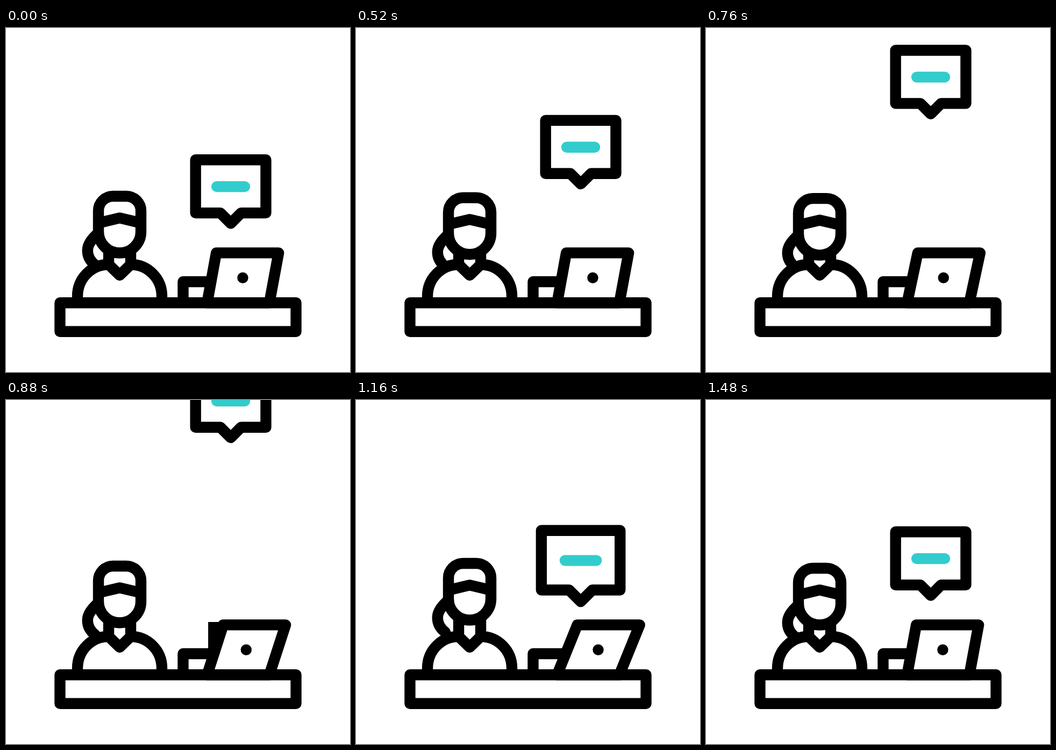
An HTML page with a canvas for the animation above (2 s loop, 640x640 px).

```html
<!DOCTYPE html>
<html lang="en">
<head>
<meta charset="utf-8">
<title>Reception desk</title>
<style>
  html, body { margin: 0; width: 100%; height: 100%; overflow: hidden; background: #fff; }
  canvas { display: block; width: 100vw; height: 100vh; }
</style>
</head>
<body>
<canvas id="stage" width="640" height="640"></canvas>
<script>
const ctx = document.getElementById('stage').getContext('2d');
const LOOP = 2000, STEP = 40;
const INK = '#000', TEAL = '#33cccc', LINE = 20.4;

// Eased value at time t through [time, value] keys.
function track(t, keys) {
  if (t <= keys[0][0]) return keys[0][1];
  for (let i = 1; i < keys.length; i++) {
    const [t0, a] = keys[i - 1], [t1, b] = keys[i];
    if (t < t1) {
      const p = (t - t0) / (t1 - t0);
      return a + (b - a) * p * p * (3 - 2 * p);
    }
  }
  return keys[keys.length - 1][1];
}

function draw(path, fill, color = INK) {
  if (fill) {
    ctx.fillStyle = '#fff';
    ctx.fill(path);
  }
  ctx.strokeStyle = color;
  ctx.stroke(path);
}

function polygon(points) {
  const path = new Path2D();
  points.forEach(([x, y]) => path.lineTo(x, y));
  path.closePath();
  return path;
}

const ponytail = new Path2D('M172 381C160 392 151.7 402 151.7 414C151.7 425 157 434 166 441');
const neck = new Path2D('M191 408V440M232 408V440');
const shirt = new Path2D(
  'M133 511V499C133 466 159 440 191 440L211.5 460L232 440C264 440 290 466 290 499V511');
const face = new Path2D(
  'M172 340A27 27 0 0 1 199 313H224A27 27 0 0 1 251 340V379A39.5 39.5 0 0 1 172 379Z');
const fringe = new Path2D('M172 362.7L211.5 353.4L251 362.7');
const stand = new Path2D('M329.5 511V472H398');
const desk = new Path2D('M100.4 511.2H539.6V564.8H100.4Z');

const BUBBLE_X = 418.1, BUBBLE_Y = 304.5;
const bubbleOutline = [
  [-65.4, -59.3], [65.4, -59.3], [65.4, 39.6], [19.3, 39.6],
  [0, 59], [-19.3, 39.6], [-65.4, 39.6]
];

// Scales the geometry only, so the line weight stays constant.
function drawBubble(y, scale) {
  const place = ([px, py]) => [BUBBLE_X + px * scale, y + py * scale];
  ctx.lineJoin = scale < 0.6 ? 'miter' : 'round';
  draw(polygon(bubbleOutline.map(place)), true);
  ctx.lineJoin = 'round';
  draw(polygon([[-26, -9.4], [26, -9.4]].map(place)), false, TEAL);
}

function drawPerson(headY) {
  ctx.save();
  ctx.translate(0, headY);
  draw(ponytail);
  ctx.restore();
  draw(shirt, true);
  draw(neck);
  ctx.save();
  ctx.translate(0, headY);
  draw(face, true);
  draw(fringe);
  ctx.restore();
}

function drawLaptop(lean) {
  draw(polygon([[391.2 + lean, 418.4], [507.2 + lean, 418.4], [490, 511.3], [374.2, 511.3]]), true);
  ctx.fillStyle = INK;
  ctx.beginPath();
  ctx.arc(440.5 + lean * 0.49, 464.8, 10.2, 0, Math.PI * 2);
  ctx.fill();
}

function render(t) {
  ctx.fillStyle = '#fff';
  ctx.fillRect(0, 0, 640, 640);
  ctx.lineWidth = LINE;
  ctx.lineCap = 'round';
  ctx.lineJoin = 'round';

  drawPerson(track(t, [[420, 0], [660, 7.2], [1040, -11], [1480, 0]]));

  // The first bubble accelerates away while the next rises from the laptop.
  if (t < 1000) {
    const rise = 5.66e-4 * Math.max(0, t - 160) ** 2;
    drawBubble(BUBBLE_Y - rise, 1);
  }
  if (t >= 800) {
    const y = track(t, [[800, 469], [1200, BUBBLE_Y]]);
    drawBubble(y, track(t, [[800, 0.41], [1200, 1.14], [1480, 1]]));
  }

  draw(stand);
  draw(desk, true);
  drawLaptop(track(t, [[680, 0], [1060, 24], [1480, 0]]));
}

const start = performance.now();
function tick() {
  const t = (performance.now() - start) % LOOP;
  render(Math.floor(t / STEP) * STEP);
  requestAnimationFrame(tick);
}
tick();
</script>
</body>
</html>
```
